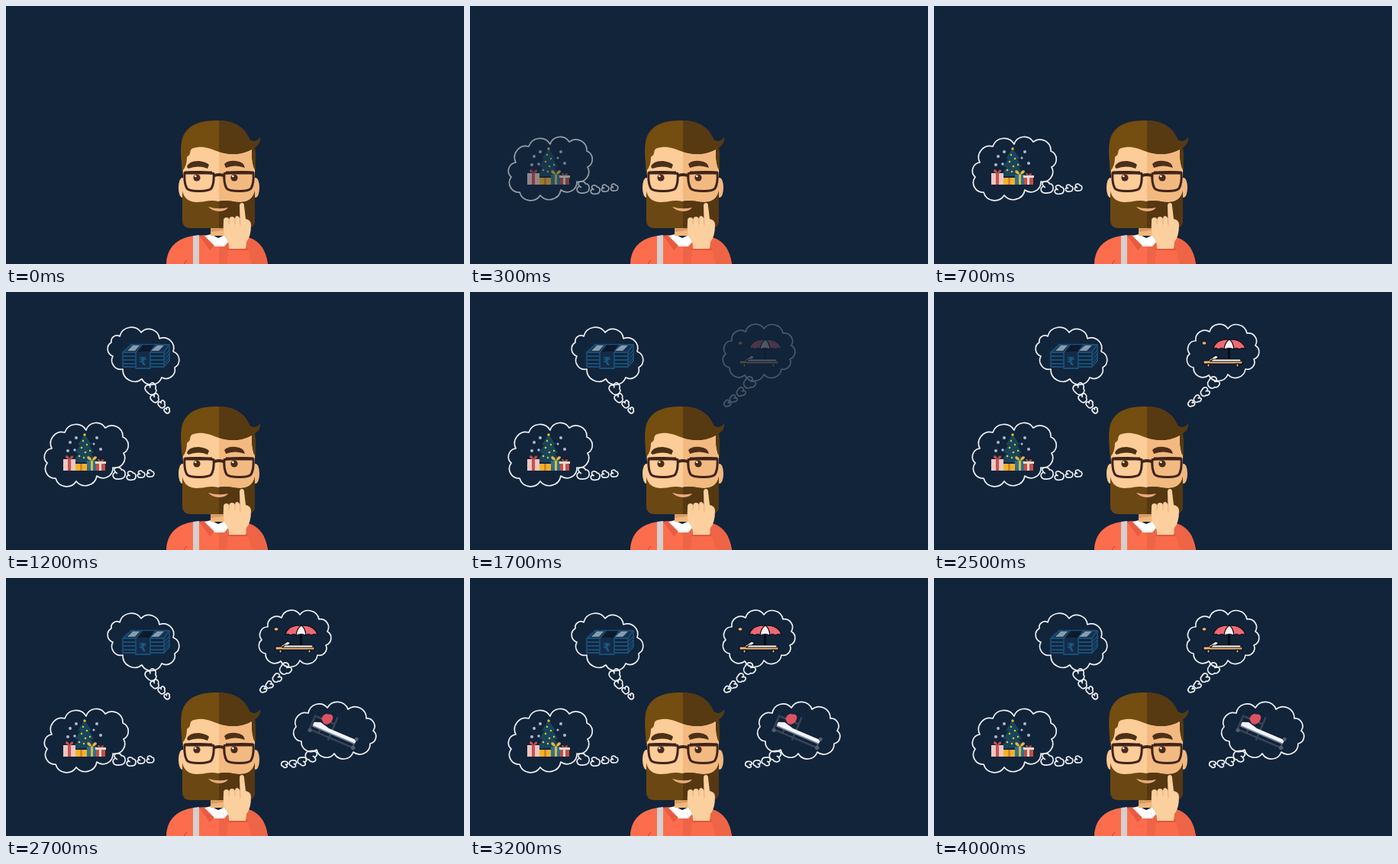
Recreate the animation shown at these times as an HTML page. Size 600 by 338 pixels, loop 4.1 s.

```html
<!DOCTYPE html>
<html lang="en">
<head>
<meta charset="utf-8">
<title>Daydreams</title>
<style>
  html, body { margin: 0; width: 100%; height: 100%; overflow: hidden; background: #12243a; }
  svg { display: block; width: 100vw; height: 100vh; }
  .line { fill: none; stroke: #eef1f5; stroke-width: 1.7; stroke-linejoin: round; stroke-linecap: round; }
  .rupee { font: bold 15px "DejaVu Sans", sans-serif; fill: #1b5a88; }
</style>
</head>
<body>
<svg viewBox="0 0 600 338" preserveAspectRatio="none">
  <defs>
    <clipPath id="dark"><rect x="279" y="140" width="70" height="198"/></clipPath>
    <path id="hair" d="M231 220 C230 205 228 190 230 178 C233 160 248 150 274 150 C297 149 313 158 319 175 C325 179 330 177 333 172 C333 179 330 183 326 185 C327 196 327 208 326 220 L231 220Z"/>
    <path id="face" d="M232 215 Q237 209 237 198 C238 196 240 197 241 193 Q241 187 246 186 C258 183 265 186 276 190 C292 197 310 195 322 188 Q321 207 326 215 V262 H232Z"/>
    <path id="beard" d="M231 242 C233 252 240 257 250 257 C260 257 266 253 278 256 C291 253 297 257 307 257 C317 257 324 252 326 242 V280 Q326 291 315 291 H242 Q231 291 231 280Z"/>
    <path id="shirt" d="M210 338 C211 316 224 304 246 301 L264 300 L278 307 L292 300 L312 302 C331 305 340 318 343 338Z"/>
  </defs>

  <g id="man">
    <use href="#shirt" fill="#fb6d4c"/>
    <use href="#shirt" fill="#ed6546" clip-path="url(#dark)"/>
    <path d="M245 301 L253 300 V338 H245Z" fill="#d3d0cd"/>
    <path d="M233 338 Q235 335 237 333" fill="none" stroke="#a8453a" stroke-width="1"/>
    <path d="M258 302 L268 299 L278 304 L289 299 L297 302 L286 315 H270Z" fill="#fff"/>
    <path d="M253 301 L260 301 L273 314 L267 320Z" fill="#e75c40"/>
    <path d="M268 288 H290 V301 H268Z" fill="#f0b67c"/>
    <path d="M268 288 H290 V293 L268 296Z" fill="#d99b62"/>

    <ellipse cx="231" cy="238" rx="5" ry="13" fill="#fbca96"/>
    <ellipse cx="327" cy="238" rx="5" ry="13" fill="#f1b87e"/>
    <use href="#hair" fill="#744d10"/>
    <use href="#hair" fill="#573a12" clip-path="url(#dark)"/>
    <use href="#face" fill="#fccc99"/>
    <use href="#face" fill="#f2ba80" clip-path="url(#dark)"/>
    <use href="#beard" fill="#6b4813"/>
    <use href="#beard" fill="#553812" clip-path="url(#dark)"/>
    <path d="M265 263 Q278 267 291 264 Q288 269 278 269 Q269 268 265 263Z" fill="#e9ab7c"/>

    <g fill="#4c3017">
      <path d="M237 211 Q239 203 252 203 Q262 204 266 208 L264 213 Q251 208 239 213Z"/>
      <path d="M286 207 Q291 202 301 203 Q312 204 313 212 Q300 207 288 212Z"/>
    </g>
    <g fill="#4a2b1c">
      <circle cx="250" cy="225" r="4.6"/>
      <circle cx="299" cy="225" r="4.6"/>
    </g>
    <g fill="#fff">
      <circle cx="248.3" cy="223" r="1.3"/>
      <circle cx="297.3" cy="223" r="1.3"/>
    </g>
    <g fill="none" stroke="#40241a" stroke-width="3" stroke-linejoin="round">
      <path d="M234 218.500 Q253 216 272 219.500 Q273 232 269 239 Q266 242.500 252 242.500 Q240 242.500 237 239 Q233 232 234 218.500Z"/>
      <path d="M286 219.500 Q305 216 324 218.500 Q325 232 321 239 Q318 242.500 306 242.500 Q292 242.500 289 239 Q285 232 286 219.500Z"/>
      <path d="M272 222.500 Q279 219.500 286 222.500" stroke-width="4"/>
      <path d="M234 218.500 H270 M288 218.500 H324" stroke-width="4"/>
    </g>

    <path d="M289 338 L291 317 H316 L322 338Z" fill="#f96b4a"/>
    <path d="M291 317 H316 L317 320 H290Z" fill="#e2573e"/>
    <path d="M292 318 Q293 310 287 303 Q284 298 285 281 Q285 277 289 277 Q292 277 292 280 Q293 276 296 276 Q299 276 300 279 Q300 275 303 275 Q306 276 306.500 279 L306 262 Q306 258 309 258 Q312 258 312 262 L314 279 Q321 280 321 287 Q321 302 315 309 L314 318Z" fill="#fccf9e"/>
    <path d="M292 280 V286 M300 279 V286 M306.500 279 L307 288" fill="none" stroke="#e5aa72" stroke-width="1"/>
  </g>

  <g class="thought">
    <g fill="#aeb9d6">
      <circle cx="92" cy="191" r="2"/><circle cx="84" cy="197" r="2"/>
      <circle cx="81" cy="208" r="2"/><circle cx="90" cy="207" r="1.800"/>
      <circle cx="119" cy="191" r="2"/><circle cx="124" cy="206" r="2"/>
      <circle cx="115" cy="199" r="1.500"/>
    </g>
    <path d="M103 186 L112 200 H109 L115 211 H111 L118 223 H88 L95 211 H91 L97 200 H94Z" fill="#17465c"/>
    <g fill="#f2bd32">
      <circle cx="103" cy="187" r="1.700"/><circle cx="101" cy="195" r="1.200"/>
      <circle cx="106" cy="200" r="1.200"/><circle cx="99" cy="204" r="1.300"/>
      <circle cx="104" cy="210" r="1.300"/><circle cx="110" cy="208" r="1.200"/>
      <circle cx="96" cy="215" r="1.300"/><circle cx="102" cy="217" r="1.200"/>
    </g>
    <path d="M75 219 H91 V234 H75Z" fill="#eac8c1"/>
    <path d="M81 219 H85 V234 H81Z M83 219 Q76 218 79 214 Q82 214 83 219 Q85 213 88 215 Q89 218 83 219Z" fill="#cf4e50"/>
    <path d="M91 225 H106 V234 H91Z" fill="#f3b422"/>
    <path d="M97 225 H100 V234 H97Z" fill="#d4813a"/>
    <path d="M106 221 H119 V234 H106Z" fill="#2c7195"/>
    <path d="M111 221 H114 V234 H111Z M112.500 221 Q104 219 107 215 Q111 215 112.500 221 Q115 213 119 216 Q119 220 112.500 221Z" fill="#e7b53a"/>
    <path d="M118 224 H130 V234 H118Z" fill="#c84e43"/>
    <path d="M122 224 H125 V234 H122Z M117 222 H131 V225 H117Z" fill="#eadbd4"/>
    <path d="M124 222 Q118 221 121 219 Q123 219 124 222 Q126 218 128 220 Q128 222 124 222Z" fill="#d9573f"/>
  </g>

  <g class="thought">
    <g fill="none" stroke="#184f78" stroke-width="1.800" stroke-linejoin="round">
      <path d="M164 69 H214 L207 79 H153Z" fill="#14324f"/>
      <path d="M153 79 V98 H207 L214 90 V69 M207 79 V98"/>
      <path d="M154 84 H207 L214 76 M154 89 H207 L214 81 M154 94 H207 L214 86"/>
      <path d="M178 69 L170 79 V100 H189 V79 L196 69" fill="#132c47"/>
    </g>
    <path d="M166 70 H175 L169 77 H159Z M198 70 H207 L200 77 H190Z" fill="#8e99a8"/>
    <path d="M179 70 H194 L188 78 H172Z" fill="#0d1a2b"/>
    <text class="rupee" x="179.500" y="96" text-anchor="middle">₹</text>
  </g>

  <g class="thought">
    <ellipse cx="354" cy="67" rx="3" ry="2.300" fill="#f3b271" stroke="#0a0e16"/>
    <path d="M386.500 74 V92" stroke="#05080d" stroke-width="2.500"/>
    <g stroke="#090b12" stroke-width="1.200" stroke-linejoin="round">
      <path d="M366 75 Q368 62 387 62 Q405 62 408 75 Q404 72 400 75 Q396 72 393 75 Q387 72 380 75 Q377 72 373 75 Q369 72 366 75Z" fill="#ee6872"/>
      <path d="M380 75 Q381 66 387 62 Q392 66 393 75 Q387 72 380 75Z" fill="#f9f2f3"/>
      <path d="M357 91 L369 83 L373 85 L366 91Z" fill="#f5f3f0"/>
      <path d="M353 90 H404 V94 H353Z" fill="#f5b678"/>
      <path d="M365 88 H402 V91 H362Z" fill="#fff"/>
      <path d="M358 94 H361 V98 H358Z M396 94 H399 V98 H396Z" fill="#f5b678"/>
    </g>
  </g>

  <g class="thought">
    <g transform="translate(430 201) rotate(23)">
      <g fill="none" stroke="#39445a" stroke-width="2.300" stroke-linecap="round">
        <path d="M-31 -9 V11 M-31 -9 H-4 M-3 -18 V13 M-30 10 H31 M30 0 V11 M-18 10 V3"/>
      </g>
      <path d="M-22 -9 Q-22 -18 -15 -18 Q-12 -20 -9 -17 Q-6 -10 -12 -5 Q-17 -2 -22 -9Z" fill="#dd5262"/>
      <path d="M-29 -1 L-21 -4 L-8 -1 H31 V4 H-29Z" fill="#f2f5fb"/>
      <path d="M-29 4.500 H31" stroke="#8490a6" stroke-width="1.500"/>
      <g fill="#525d72">
        <circle cx="-30" cy="11" r="2.600"/><circle cx="31" cy="10" r="2.800"/>
        <circle cx="31" cy="-2" r="2.400"/>
      </g>
    </g>
  </g>
</svg>
<script>
const NS = "http://www.w3.org/2000/svg";
const LOOP = 4100, STEP = 100;

// cusps: where cloud bumps meet; tail: x, y, radius; start and steps give the fade
const thoughts = [
  { start: 100, steps: 5, turn: 0,
    cusps: [[77,184],[105,181],[130,178],[153,190],[154,211],[140,230],[119,241],[92,248],[65,244],[54,224],[60,205]],
    tail: [[148,238,8.5],[164,241,6.3],[177,239,5],[189,238,5]] },
  { start: 1000, steps: 3, turn: 50,
    cusps: [[149,58],[177,53],[201,61],[219,78],[221,99],[204,112],[178,114],[153,101],[140,84],[138,66]],
    tail: [[190,127,8],[195,139,6],[204,147,5],[211,155,4]] },
  { start: 1700, steps: 4, turn: 130,
    cusps: [[361,52],[385,48],[410,54],[421,70],[419,88],[408,101],[385,108],[360,109],[340,99],[335,81],[343,64]],
    tail: [[366,119,8],[355,131,6],[345,140,5],[337,146,4.5]] },
  { start: 2700, steps: 1, turn: 180,
    cusps: [[396,177],[421,170],[448,172],[472,184],[481,200],[477,217],[455,228],[430,230],[407,225],[387,214],[380,195]],
    tail: [[400,233,8],[388,240,6],[376,243,5],[365,244,4.5]] }
];

function addPath(parent, d, transform) {
  const p = document.createElementNS(NS, "path");
  p.setAttribute("d", d);
  p.setAttribute("class", "line");
  p.setAttribute("vector-effect", "non-scaling-stroke");
  if (transform) p.setAttribute("transform", transform);
  parent.append(p);
}

function cloud(pts) {
  let d = `M${pts[0]}`;
  pts.forEach((p, i) => {
    const q = pts[(i + 1) % pts.length];
    const r = 0.55 * Math.hypot(q[0] - p[0], q[1] - p[1]);
    d += `A${r} ${r} 0 0 1 ${q}`;
  });
  return d + "Z";
}

const puff = "M-.55 -.25C-1.2 -1 .2 -1.25 .4 -.6C1.2 -.65 1.2 .85 .1 .8C-.9 1 -1.25 .2 -.55 -.25L-.3 -.05";
const groups = [...document.querySelectorAll(".thought")];

groups.forEach((g, i) => {
  const { cusps, tail, turn } = thoughts[i];
  addPath(g, cloud(cusps));
  for (const [x, y, r] of tail)
    addPath(g, puff, `translate(${x} ${y}) rotate(${turn}) scale(${r})`);
});

function draw(now) {
  const t = Math.floor((now % LOOP) / STEP) * STEP;
  groups.forEach((g, i) => {
    const { start, steps } = thoughts[i];
    const done = ((t - start) / STEP + 1) / steps;
    g.setAttribute("opacity", Math.max(0, Math.min(1, done)));
  });
}

const begin = performance.now();
function tick() {
  draw(performance.now() - begin);
  requestAnimationFrame(tick);
}
tick();
</script>
</body>
</html>
```
